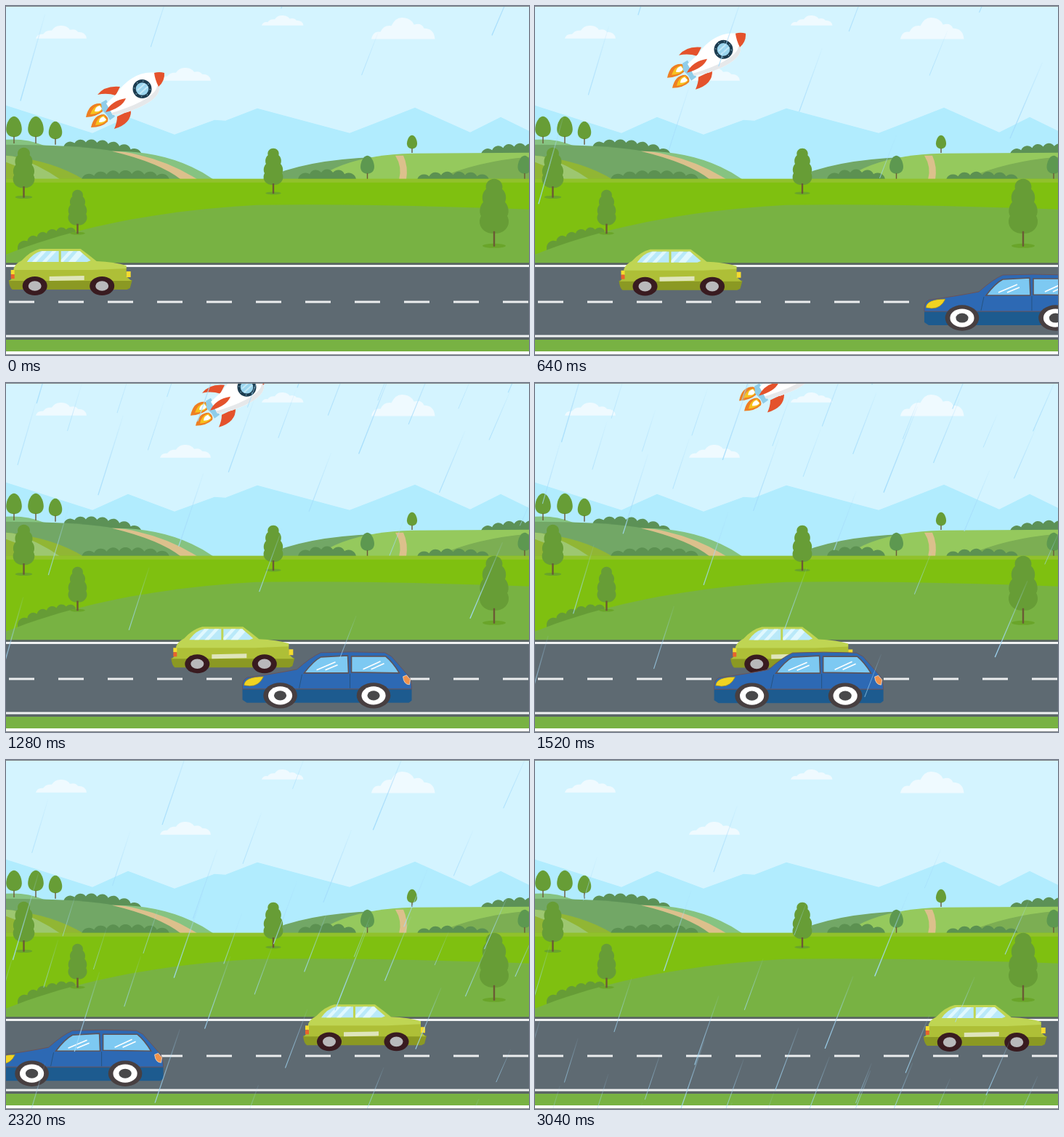
These frames come from a looping animation (720 px wide and 480 px high, 3.12 s). An HTML page:

```html
<!DOCTYPE html>
<html lang="en">
<head>
<meta charset="utf-8">
<title>Rainy road</title>
<style>
html, body { margin: 0; width: 100%; height: 100%; overflow: hidden; background: #fff; }
svg { display: block; }
</style>
</head>
<body>
<svg width="720" height="480" viewBox="0 0 720 480">
  <defs>
    <linearGradient id="drop" x1="1" y1="0" x2="0" y2="1">
      <stop offset="0" stop-color="#a5dafa" stop-opacity=".1"/>
      <stop offset=".6" stop-color="#a5dafa" stop-opacity=".75"/>
      <stop offset="1" stop-color="#a3ddfc"/>
    </linearGradient>
    <path id="cloud" fill="#effaff" d="M0 18Q2 11 10 12Q14 6 22 7Q27 -1 36 .3Q44 1 47 6Q55 4 58 9Q69 9 70 18Z"/>
    <path id="round" d="M0 0C6 0 11 10 11 18C11 25 6 29 0 29S-11 25 -11 18C-11 10 -6 0 0 0Z"/>
    <path id="tall" d="M0 0C8 0 13 7 11 14C17 19 17 27 15 32C20 37 21 46 18 51C24 62 16 74 4 75H-4C-16 74 -24 62 -18 51C-21 46 -20 37 -15 32C-17 27 -17 19 -11 14C-13 7 -8 0 0 0Z"/>
  </defs>

  <rect width="720" height="480" fill="#fff"/>
  <rect width="720" height="240" fill="#d4f4ff"/>

  <g transform="translate(0 .8)">
    <path fill="#b1ecfe" d="M0 136L119 174L168 152L232 176L287 156L302 157L346 140L473 174L563 139L639 173L681 152L720 171V240H0Z"/>
    <use href="#cloud" x="41" y="26"/>
    <use href="#cloud" transform="translate(352 12) scale(.82 .78)"/>
    <use href="#cloud" transform="translate(503 15) scale(1.25 1.65)"/>
    <use href="#cloud" x="212" y="84"/>

    <g id="backBushes" fill="#5c9156"></g>
    <path fill="#86c381" d="M0 183Q28 181 52 191L150 199Q230 199 286 238H0Z"/>
    <path fill="#72a766" d="M0 190Q105 190 155 200Q210 212 246 238H0Z"/>
    <path fill="#dcc08c" d="M146 199Q164 199 182 204Q226 214 264 238H241Q212 215 146 199Z"/>
    <path fill="#91b634" d="M0 205Q65 212 107 238H0Z"/>
    <path fill="#9dc770" d="M0 205L10 206Q45 217 75 238H41Q22 221 0 214Z"/>
    <path fill="#72a766" d="M352 238Q420 206 540 207V238Z"/>
    <path fill="#95c95d" d="M426 238Q470 204 560 202L720 201V238Z"/>
    <path fill="#7cae53" d="M590 238Q650 212 720 207V238Z"/>
    <path fill="#dcc08c" d="M536 205H547Q554 220 551 238H541Q546 221 536 205Z"/>
    <g id="farTrees"></g>
    <g id="frontBushes" fill="#5c9151"></g>

    <rect y="237" width="720" height="117" fill="#7fc010"/>
    <rect y="237" width="720" height="5" fill="#91c12c"/>
    <g id="slopeBush" fill="#669c36"></g>
    <path fill="#78b243" d="M0 341C100 301 220 280 345 273C470 271 600 275 720 279V354H0Z"/>
    <g id="nearTrees"></g>
  </g>

  <rect y="353.5" width="720" height="106" fill="#5e6a72"/>
  <path stroke="#59645f" stroke-width="2" d="M0 354.5H720M0 457.5H720"/>
  <path stroke="#f0f1f2" stroke-width="3" d="M0 357.5H720M0 454H720"/>
  <path stroke="#eceeef" stroke-width="3" stroke-dasharray="35 33" d="M4 407H720"/>
  <rect y="459" width="720" height="16" fill="#78b243"/>

  <g id="rocket">
    <path fill="#ee7f23" d="M110 153Q114 133 130 134Q137 138 133 145Q125 152 110 153ZM117 167Q121 149 135 149Q142 153 140 159Q132 167 117 167Z"/>
    <path fill="#f7c21e" d="M116 149Q120 137 130 136L133 142Q128 149 116 149ZM123 164Q125 153 135 150L139 157Q134 163 123 164Z"/>
    <path fill="#fff" d="M122 145Q123 138 129 137L132 141Q130 146 122 145ZM128 160Q128 154 134 152L138 156Q136 160 128 160Z"/>
    <path fill="#e4522c" d="M126 122Q136 109 157 111L151 123Q139 119 126 122ZM149 169Q153 160 153 152L172 143Q173 162 149 169Z"/>
    <path fill="#8fcde9" d="M131 133L138 129L150 152L143 157L139 150L132 143Z"/>
    <path fill="#fff" d="M205 92C186 89 165 101 152 121L138 134L147 150L167 146C190 138 214 126 211 110Z"/>
    <path fill="#e6e8ea" d="M147 150L167 146C190 138 214 126 211 110L208 110C207 122 183 136 145 147Z"/>
    <path fill="#e4522c" d="M204 92Q211 90 218 92Q219 103 210 111Q205 101 204 92ZM137 146Q145 130 165 127Q160 140 137 146Z"/>
    <circle cx="187.5" cy="114" r="13" fill="#1c3c50"/>
    <circle cx="187.5" cy="114" r="10.8" fill="none" stroke="#7fa9b8" stroke-width="1.2" stroke-dasharray="1.5 7"/>
    <circle cx="187.5" cy="114" r="8.8" fill="#9bd5ee"/>
    <path stroke="#c5e9f7" stroke-width="2" d="M181 116L191 107M184 121L195 111"/>
  </g>

  <g id="greenCar">
    <path fill="#8b9923" d="M4 377H174L171 388L167 390H9Q5 387 4 377Z"/>
    <path fill="#aebf37" d="M11 360H166V372L173 378H5L11 372Z"/>
    <path fill="#bfd553" d="M11 362Q12 355 22 350Q34 337 47 334H103Q114 342 125 351Q150 352 166 357V361L120 363H11Z"/>
    <path fill="#b9e9f9" d="M29 352Q37 340 49 337H73V352ZM76 337H102L117 350L112 352H76Z"/>
    <path fill="#e0f8fe" d="M36 352L50 337H56L42 352ZM50 352L64 337H70L56 352ZM76 349L87 337H93L79 352H76ZM86 352L99 337H102L106 341L96 352Z"/>
    <path fill="#dfe5bb" d="M60 372L108 371V377L60 378Z"/>
    <path fill="#f4db2f" d="M166 365H172V373H166ZM7 363H12V369H7Z"/>
    <path fill="#e8632c" d="M7 369H12V375H7Z"/>
    <g class="wheels"></g>
  </g>

  <g id="blueCar">
    <path fill="#1d5b8f" d="M0 417H233V437L229 440H6L0 436Z"/>
    <path fill="#2d69b4" stroke="#6c5358" d="M0 421Q-1 408 7 405Q45 400 75 394Q94 377 108 371Q150 369 196 371L205 376L226 400Q233 406 233 421Z"/>
    <path fill="#7dc9f2" stroke="#5d5358" stroke-width="1.6" d="M85 399Q98 382 108 377L145 375L146 399ZM150 376H197Q207 384 216 399L150 398Z"/>
    <path stroke="#fff" stroke-width="1.6" d="M102 395L128 384M114 395L131 388M166 394L190 383M177 394L195 386"/>
    <path fill="none" stroke="#265482" d="M82 401L78 420M148 400V420"/>
    <path fill="#f0d322" stroke="#8c7b30" stroke-width=".7" d="M2 416Q3 404 29 404Q23 417 10 417Z"/>
    <path fill="#f0924c" stroke="#f3dfc8" stroke-width=".8" d="M221 404L226 402L231 408L230 415Q222 415 221 404Z"/>
    <g class="wheels"></g>
  </g>

  <g id="rain" stroke="url(#drop)" stroke-linecap="round"></g>
  <path stroke="#7f8486" d="M0 .5H720M0 479.5H720"/>
</svg>
<script>
const LOOP = 3120, STEP = 80;
const pick = s => document.querySelector(s);

// A row of scallops between two points, arched upwards by `rise`.
function bush(x0, y0, x1, y1, rise, bumps) {
  const dx = (x1 - x0) / bumps;
  let d = `M${x0} ${y0}`, last = y0;
  for (let i = 1; i <= bumps; i++) {
    const u = i / bumps;
    const y = y0 + (y1 - y0) * u - rise * Math.sqrt(Math.max(0, Math.sin(Math.PI * u)));
    const r = Math.hypot(dx, y - last) * .58;
    d += `A${r} ${r} 0 0 1 ${x0 + dx * i} ${y}`;
    last = y;
  }
  return `<path d="${d}V${y1 + 8}L${x0} ${y0 + 8}Z"/>`;
}
pick('#backBushes').innerHTML = bush(79, 194, 187, 206, 12, 7) + bush(654, 203, 730, 194, 5, 5);
pick('#frontBushes').innerHTML =
  bush(104, 238, 225, 238, 8, 7) + bush(402, 238, 482, 238, 10, 5) + bush(566, 238, 665, 238, 6.5, 6);
pick('#slopeBush').innerHTML = bush(16, 333, 96, 309, 9, 6);

const LEAF = '#679d36', FAR_LEAF = '#5d9850';
const foliage = (shape, x, y, size, color) =>
  `<use href="#${shape}" transform="translate(${x} ${y}) scale(${size})" fill="${color}"/>`;
const trunk = (x, from, to, width) =>
  `<path stroke="#6b5a35" stroke-width="${width}" d="M${x} ${from}V${to}"/>`;
const farTree = (x, y, size, color = LEAF) =>
  foliage('round', x, y, size, color) + trunk(x, y + 28 * size, y + 38 * size, 1.4);
const nearTree = (x, y, size) =>
  `<ellipse cx="${x}" cy="${y + 92 * size}" rx="${16 * size}" ry="${3 * size}" fill="#6aa52a"/>` +
  foliage('tall', x, y, size, LEAF) + trunk(x, y + 72 * size, y + 93 * size, 2.4);

pick('#farTrees').innerHTML =
  farTree(11, 151, .98) + farTree(41, 151, .98) + farTree(68, 158, .84) + farTree(559, 177, .64) +
  farTree(497.5, 205, .86, FAR_LEAF) + farTree(714, 205, .86, FAR_LEAF);
pick('#nearTrees').innerHTML =
  nearTree(24.5, 194, .74) + nearTree(368, 195, .67) + nearTree(98.5, 252, .65) + nearTree(672, 237, 1);

const wheel = (x, y, rings) => rings.map(([r, color]) =>
  `<ellipse cx="${x}" cy="${y}" rx="${r}" ry="${r * .76}" fill="${color}"/>`).join('');
const greenRings = [[17, '#391b20'], [9, '#b9b9bb']];
const blueRings = [[23.3, '#473f41'], [16.6, '#fff'], [8.6, '#48484a']];
pick('#greenCar .wheels').innerHTML = wheel(40, 385, greenRings) + wheel(132.5, 385, greenRings);
pick('#blueCar .wheels').innerHTML = wheel(52, 430, blueRings) + wheel(180.5, 430, blueRings);

// Rain: one tall sheet of seeded streaks, denser near its top and bottom.
const DROPS = 48;
let seed = 7;
const random = () => (seed = seed * 16807 % 2147483647) / 2147483647;

function drop(i) {
  const u = (i + random()) / DROPS;
  const x = 20 + 760 * (i * .618034 % 1);
  const y = 130 - 750 * (u + .12 * Math.sin(2 * Math.PI * u));
  const h = 40 + 85 * random();
  const lean = h * (.28 + x * .00022);
  const strength = Math.min(1, .25 + h / 200 + x / 4000);
  return `<path d="M${x + lean} ${y - h}L${x} ${y}" opacity="${strength}" stroke-width="${.7 + h / 180}"/>`;
}
pick('#rain').innerHTML = Array.from({ length: DROPS }, (_, i) => drop(i)).join('');

const move = (id, x, y) => pick(id).setAttribute('transform', `translate(${x} ${y})`);

function render(t) {
  move('#greenCar', t * .1747 - .3, t * .001);
  move('#blueCar', 746.4 - t * .3288, (t - 1400) * .0013);
  move('#rocket', t * .1125, -t * .0846);
  const late = Math.max(0, t - 1500) ** 2; // the rain speeds up in the second half
  move('#rain', -t * .0235 - late * 1.22e-5, t * .2215 + late * 2.45e-5);
}

const start = performance.now();
function tick() {
  const t = (performance.now() - start) % LOOP;
  render(Math.floor(t / STEP) * STEP);
  requestAnimationFrame(tick);
}
tick();
</script>
</body>
</html>
```
